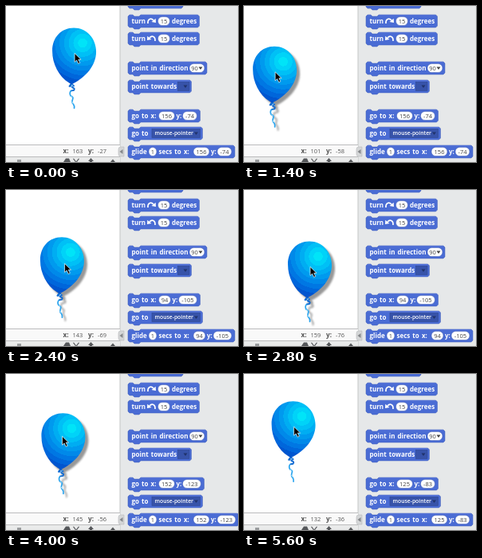
An HTML page for the animation above (6200 ms loop, 291 px wide and 196 px high).

```html
<!DOCTYPE html>
<html lang="en">
<head>
<meta charset="utf-8">
<title>Balloon drag</title>
<style>
html, body { margin: 0; width: 100%; height: 100%; overflow: hidden; background: #fff; }
svg { display: block; width: 291px; height: 196px; font-family: "Open Sans", "Noto Sans", sans-serif; }
.label { font-size: 8px; font-weight: 700; word-spacing: 1px; fill: #fff; }
.value { font-size: 7.5px; fill: #444; text-anchor: middle; }
.menu { font-size: 6.8px; font-weight: 600; fill: #fff; }
.readout { font-size: 7.5px; fill: #555; }
.axis { font-size: 8.2px; font-weight: 700; }
</style>
</head>
<body>
<svg viewBox="0 0 291 196">
  <defs>
    <radialGradient id="skin" gradientUnits="userSpaceOnUse" cx="38" cy="19" r="58"></radialGradient>
    <filter id="soft" x="-20%" y="-20%" width="150%" height="150%"><feGaussianBlur stdDeviation="0.8"/></filter>
    <clipPath id="stage"><rect width="142" height="174"/></clipPath>
    <path id="body" d="M27 0C43 0 55 13 55 30C55 47 42 62 26 70Q23.5 71 21 69C8 61 0 45 0 29C0 12 11 0 27 0Z"/>
    <path id="knot" fill="none" stroke-linecap="round" stroke-linejoin="round" stroke-width="1.9"
      d="M24 70L21.500 73.500L27 73ZM25 75Q29 76 27 78.500L24.500 79"/>
    <path id="ribbon" fill="none" stroke-linecap="round" stroke-width="1.7"
      d="M23.500 79Q21 82 23 85.500Q27 87 25.500 90Q24 94 26.500 96Q28 98 27.500 101"/>
  </defs>

  <rect width="291" height="196" fill="#fff"/>
  <rect x="143" width="148" height="196" fill="#e6e8e9"/>
  <rect x="142.5" width="1" height="196" fill="#c3c5c6"/>
  <rect y="174" width="143" height="15" fill="#f9f9f9"/>
  <path d="M0 174.5H143M0 189.5H143" stroke="#bbbcbd"/>
  <rect y="190" width="143" height="6" fill="#e9eaea"/>
  <g fill="#55575a">
    <path d="M72 196L75 191.5H79L81 196Z"/>
    <path d="M84 192L85 191.5L88.5 196H87ZM92 192L91 191.5L87.5 196H89Z"/>
    <path d="M103 195L106.5 191L110 195H108V196H105V195Z"/>
    <path d="M131 196L134 192.500L137 196Z"/>
    <rect x="14" y="193" width="5" height="3" fill="#9a9c9e"/>
  </g>
  <path d="M148 177H144Q141 177 141 180V186Q141 189 144 189H148Z" fill="#d4d6d7" stroke="#b9bbbc" stroke-width=".6"/>
  <path d="M146.500 180V186L142.500 183Z" fill="#85888b"/>

  <g class="readout">
    <text class="axis" x="71.500" y="185">x:</text><text id="mouseX" x="83.500" y="185"></text>
    <text class="axis" x="103" y="185">y:</text><text id="mouseY" x="115" y="185"></text>
  </g>

  <g id="blocks"></g>
  <g id="moving"></g>

  <g clip-path="url(#stage)">
    <g id="balloon">
      <g id="shadow" transform="translate(4 4)" opacity=".5" filter="url(#soft)">
        <use href="#body" fill="#333"/>
        <use href="#knot" stroke="#333"/>
        <use href="#ribbon" stroke="#333"/>
      </g>
      <use href="#ribbon" stroke="#2aa4ee"/>
      <use href="#knot" stroke="#0f6ad2"/>
      <path d="M24 73.500L26 72M23.500 86L25 87M25 93L26 95" stroke="#b5e8fb" stroke-width=".9" stroke-linecap="round"/>
      <use href="#body" fill="url(#skin)"/>
    </g>
    <path id="cursor" d="M0 0V11L2.600 8.700L4.600 13L6.700 12L4.700 7.900H8Z" fill="#000" stroke="#fff" stroke-width=".7"/>
  </g>
</svg>
<script>
const LOOP = 6200;
const UNIT = 0.757; // pixels per stage unit
const BLUE = "#4a6cd4";
const $ = id => document.getElementById(id);

// start time, mouse x, mouse y, lifted
const poses = [
  [0, 163, -27, 0], [800, 157, -27, 1], [1000, 129, -40, 1], [1200, 108, -53, 1],
  [1400, 101, -58, 1], [1600, 101, -58, 0], [2200, 105, -58, 1], [2400, 143, -69, 1],
  [2600, 154, -74, 1], [2800, 159, -76, 1], [3000, 159, -76, 0], [3800, 155, -68, 1],
  [4000, 145, -56, 1], [4200, 137, -43, 1], [4400, 132, -36, 1], [4600, 132, -36, 0]
];
// start time, sprite x, sprite y
const drops = [[0, 156, -74], [1600, 94, -105], [3000, 152, -123], [4600, 125, -83]];

const skinColors = ["#00e4f8", "#00d3f8", "#00c0f6", "#00adf2", "#009aee", "#0089e9", "#0077e3", "#0066db", "#0055cf", "#0047c2"];
$("skin").innerHTML = skinColors.map((color, i) =>
  [i, i + 1].map(n => `<stop offset="${n / skinColors.length}" stop-color="${color}"/>`).join("")).join("");

const label = (x, y, s) => `<text class="label" x="${x}" y="${y + 2.8}">${s}</text>`;

function block(y, right) {
  const top = y - 8, bottom = y + 8;
  const d = `M153 ${top + 2}L155 ${top}H159L161 ${top + 2}H167L169 ${top}H${right - 2}L${right} ${top + 2}` +
    `V${bottom - 2}L${right - 2} ${bottom}H169L167 ${bottom + 2}H161L159 ${bottom}H155L153 ${bottom - 2}Z`;
  return `<path d="${d}" fill="${BLUE}" stroke="#3f5cb8" stroke-width=".5"/>` +
    `<path d="M155 ${top + .8}H159M169 ${top + .8}H${right - 2}" stroke="#6780dc" stroke-width=".6"/>`;
}

const pillWidth = n => 5 * String(Math.abs(n)).length + (n < 0 ? 8 : 5);

function pill(x, y, n, width = pillWidth(n), textShift = 0) {
  return `<rect x="${x}" y="${y - 5.5}" width="${width}" height="11" rx="5.5" fill="#fff" stroke="#3c58b2" stroke-width=".5"/>` +
    `<text class="value" x="${x + width / 2 + textShift}" y="${y + 2.7}">${n}</text>`;
}

const arrow = (x, y, color) => `<path d="M${x - 2.5} ${y - 1.5}h5l-2.5 3.500z" fill="${color}"/>`;

function menu(x, y, width, s = "") {
  return `<rect x="${x}" y="${y - 5.5}" width="${width}" height="11" fill="#3753a9" stroke="#2f4892" stroke-width=".6"/>` +
    `<text class="menu" x="${x + 3.5}" y="${y + 2.4}">${s}</text>` + arrow(x + width - 5, y, "#20336d");
}

function turn(y, flip) {
  return block(y, 242.500) + label(157.500, y, "turn") +
    `<g transform="translate(182.500 ${y}) scale(${flip} 1)"><path d="M-4.500 3C-5 -3 -.5 -4.500 2.500 -1" fill="none" stroke="#fff" stroke-width="1.700"/>` +
    `<path d="M0 1L5.500 2L5.200 -3.300Z" fill="#fff"/></g>` +
    pill(190.500, y, 15) + label(208, y, "degrees");
}

$("blocks").innerHTML = block(-5, 222) +
  turn(19, 1) + turn(41, -1) +
  block(78, 252) + label(157.500, 78, "point in direction") + pill(230, 78, 90, 19, -3) + arrow(244, 78, "#444") +
  block(101, 232.500) + label(157.500, 101, "point towards") + menu(215.500, 101, 14.500) +
  block(160, 246.500) + label(157.500, 160, "go to") + menu(183, 160, 60.500, "mouse-pointer");

// Block whose tail holds the sprite position and sets its length
function placeBlock(y, x, lead, [, spriteX, spriteY]) {
  const labelX = x + pillWidth(spriteX) + 2, pillX = labelX + 8;
  return block(y, pillX + pillWidth(spriteY) + 4) + lead +
    pill(x, y, spriteX) + label(labelX, y, "y:") + pill(pillX, y, spriteY);
}

const indexAt = (list, t) => list.findLastIndex(item => item[0] <= t);
const spot = ([, x, y]) => [34.6 + (x - 132) * UNIT, 34.2 - (y + 36) * UNIT];

let shownDrop = -1;

function draw(t) {
  const i = indexAt(poses, t), pose = poses[i], lifted = pose[3];
  const [x, y] = spot(pose);
  const [nextX, nextY] = lifted ? spot(poses[i + 1]) : [x, y];
  $("balloon").setAttribute("transform", `translate(${x} ${y})`);
  $("shadow").style.display = lifted ? "" : "none";
  // the pointer runs ahead of the dragged sprite
  $("cursor").setAttribute("transform", `translate(${x + 28 + (nextX - x) * .32} ${y + 32 + (nextY - y) * .32})`);
  $("mouseX").textContent = pose[1];
  $("mouseY").textContent = pose[2];

  const drop = indexAt(drops, t);
  if (drop !== shownDrop) {
    shownDrop = drop;
    $("moving").innerHTML =
      placeBlock(138, 191.500, label(157.500, 138, "go to x:"), drops[drop]) +
      placeBlock(183, 235, label(157.500, 183, "glide") + pill(179, 183, 1) + label(191.500, 183, "secs to x:"), drops[drop]);
  }
}

const start = performance.now();
function tick() {
  draw((performance.now() - start) % LOOP);
  requestAnimationFrame(tick);
}
tick();
</script>
</body>
</html>
```
